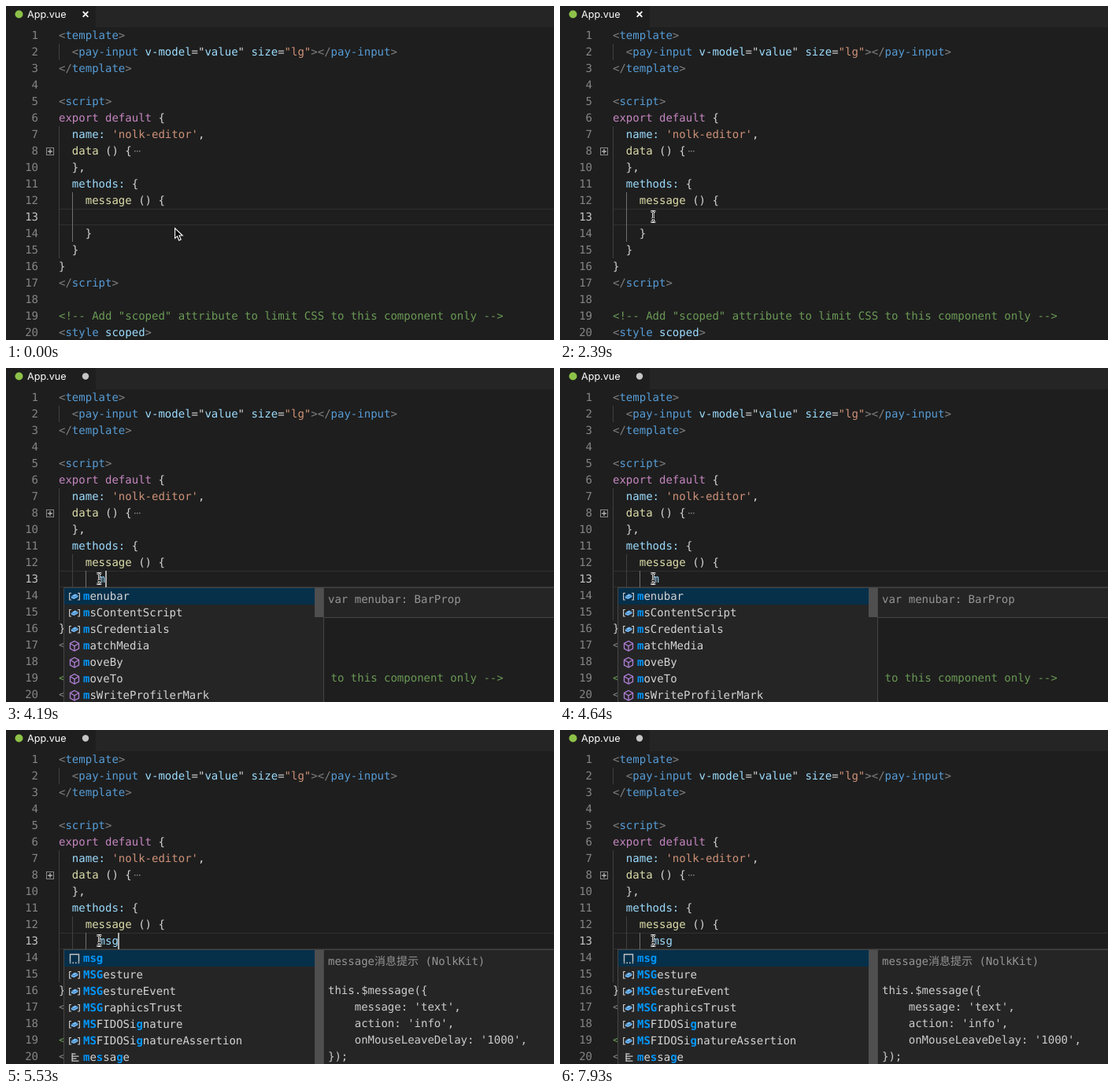
An HTML page with a canvas for the animation above (8 s loop, 696 by 425 pixels).

```html
<!DOCTYPE html>
<html lang="en">
<head>
<meta charset="utf-8">
<title>Editor autocomplete</title>
<style>
html, body { margin: 0; width: 100%; height: 100%; overflow: hidden; background: #1e1e1e; }
canvas { display: block; width: 696px; height: 425px; }
</style>
</head>
<body>
<canvas id="stage" width="696" height="425"></canvas>
<script>
const ctx = document.getElementById('stage').getContext('2d');
const LOOP = 8000, LINE = 21, TOP = 27, LEFT = 67, CHAR = 14 * 0.60205;
const MONO = '14px "DejaVu Sans Mono", "Noto Sans CJK SC", "Noto Sans CJK JP", monospace';
const C = {
  grey: '#808080', tag: '#569cd6', attr: '#9cdcfe', str: '#ce9178', text: '#d4d4d4',
  key: '#c586c0', fn: '#dcdcaa', note: '#6a9955', hit: '#0097fb'
};

// Each line: number, indent in columns, then colour/text pairs.
const CODE = [
  [1, 0, 'grey', '<', 'tag', 'template', 'grey', '>'],
  [2, 2, 'grey', '<', 'tag', 'pay-input', 'attr', ' v-model', 'text', '="', 'attr', 'value', 'text', '"',
    'attr', ' size', 'text', '=', 'str', '"lg"', 'grey', '></', 'tag', 'pay-input', 'grey', '>'],
  [3, 0, 'grey', '</', 'tag', 'template', 'grey', '>'],
  [4, 0],
  [5, 0, 'grey', '<', 'tag', 'script', 'grey', '>'],
  [6, 0, 'key', 'export default', 'text', ' {'],
  [7, 2, 'attr', 'name:', 'str', " 'nolk-editor'", 'text', ','],
  [8, 2, 'fn', 'data', 'text', ' () {'],
  [10, 2, 'text', '},'],
  [11, 2, 'attr', 'methods:', 'text', ' {'],
  [12, 4, 'fn', 'message', 'text', ' () {'],
  [13, 6],
  [14, 4, 'text', '}'],
  [15, 2, 'text', '}'],
  [16, 0, 'text', '}'],
  [17, 0, 'grey', '</', 'tag', 'script', 'grey', '>'],
  [18, 0],
  [19, 0, 'note', '<!-- Add "scoped" attribute to limit CSS to this component only -->'],
  [20, 0, 'grey', '<', 'tag', 'style', 'attr', ' scoped', 'grey', '>']
];

// Suggestions: icon name, then label with matched letters in brackets.
const STEPS = [
  { at: 4190, typed: 'm', thumb: 37, box: 39,
    items: ['field [m]enubar', 'field [m]sContentScript', 'field [m]sCredentials', 'cube [m]atchMedia',
      'cube [m]oveBy', 'cube [m]oveTo', 'cube [m]sWriteProfilerMark'],
    head: ['var menubar: BarProp'], body: [] },
  { at: 4940, typed: 'ms', thumb: 57, box: 60,
    items: ['field [ms]ContentScript', 'field [ms]Credentials', 'cube [ms]WriteProfilerMark', 'snip [ms]g',
      'field [MS]Assertion', 'field [MS]BlobBuilder', 'field [MS]Credentials'],
    head: ['var msContentScript: ExtensionScri', 'tApis'], body: [] },
  { at: 5530, typed: 'msg', thumb: 150, box: 160,
    items: ['snip [msg]', 'field [MSG]esture', 'field [MSG]estureEvent', 'field [MSG]raphicsTrust',
      'field [MS]FIDOSi[g]nature', 'field [MS]FIDOSi[g]natureAssertion', 'word [m]e[s]sa[g]e'],
    head: ['message消息提示 (NolkKit)'],
    body: ['this.$message({', "    message: 'text',", "    action: 'info',", "    onMouseLeaveDelay: '1000',", '});'] }
];

// Pointer stops: time, x, y.
const PATH = [[0, 214, 282], [150, 174, 268], [300, 167, 267], [750, 162, 267], [900, 119, 263],
  [1050, 109, 261], [1200, 105, 260], [1500, 109, 261], [1650, 116, 263]];
const BEAM_AT = 1800;
// The caret flips at each of these; typing turns it on again.
const FLIPS = [1940, 2390, 2840, 3440, 3890, 4640, 5380, 5980, 6430, 6880, 7480, 7930];

function rect(x, y, w, h, color) {
  ctx.fillStyle = color;
  ctx.fillRect(x, y, w, h);
}

function line(color, width, ...points) {
  ctx.strokeStyle = color;
  ctx.lineWidth = width;
  ctx.beginPath();
  points.forEach(([x, y], i) => i ? ctx.lineTo(x, y) : ctx.moveTo(x, y));
  ctx.stroke();
}

function dot(x, y, r, color) {
  ctx.fillStyle = color;
  ctx.beginPath();
  ctx.arc(x, y, r, 0, 7);
  ctx.fill();
}

function text(str, x, y, color, font = MONO) {
  ctx.font = font;
  ctx.fillStyle = color;
  ctx.fillText(str, x, y);
}

const rowTop = row => TOP + row * LINE;
const baseline = row => rowTop(row) + 15;

function drawTabs(dirty) {
  rect(0, 0, 696, 27, '#252526');
  rect(0, 0, 114, 27, '#1e1e1e');
  dot(16.5, 10.5, 5, '#8dc149');
  text('App.vue', 27, 15, '#ffffff', '12.6px Inter, sans-serif');
  if (dirty) {
    dot(101, 10.5, 4.2, '#c5c5c5');
  } else {
    line('#ffffff', 1.8, [97.7, 7.2], [104.3, 13.8]);
    line('#ffffff', 1.8, [104.3, 7.2], [97.7, 13.8]);
  }
}

function drawGuides(typed) {
  const dim = '#404040', lit = '#707070';
  rect(67, rowTop(1), 1, LINE, dim);
  rect(67, rowTop(6), 1, LINE * 8, dim);
  rect(84, rowTop(10), 1, LINE * 3, typed ? dim : lit);
  if (typed) rect(101, rowTop(11), 1, LINE, lit);
}

function drawCode(typed) {
  rect(LEFT, 258, 696 - LEFT, 1, '#303030');
  rect(LEFT, 278, 696 - LEFT, 1, '#303030');
  drawGuides(typed);
  CODE.forEach(([num, indent, ...parts], row) => {
    const y = baseline(row), label = String(num);
    text(label, 41 - label.length * CHAR, y, num === 13 ? '#c6c6c6' : '#858585');
    let x = LEFT + indent * CHAR;
    for (let i = 0; i < parts.length; i += 2) {
      text(parts[i + 1], x, y, C[parts[i]]);
      x += parts[i + 1].length * CHAR;
    }
  });
  text(typed, LEFT + 6 * CHAR, baseline(11), C.attr);

  // Folded block
  ctx.strokeStyle = '#8a8a8a';
  ctx.lineWidth = 1;
  ctx.strokeRect(51.5, 180.5, 9, 9);
  rect(53, 184.5, 6, 1.2, '#c5c5c5');
  rect(55.4, 182, 1.2, 6, '#c5c5c5');
  for (let i = 0; i < 3; i++) rect(163 + i * 3, 184, 1.6, 1.4, '#858585');
}

const ICONS = {
  field(x, y) {
    for (const s of [-1, 1]) {
      line('#c5c5c5', 1.2, [x + s * 4, y - 4], [x + s * 6.4, y - 4], [x + s * 6.4, y + 4.5], [x + s * 4, y + 4.5]);
    }
    ctx.fillStyle = '#75beff';
    ctx.beginPath();
    [[-4.2, 0], [0.5, -3], [4.4, -1.6], [4.4, 0.8], [-0.4, 3.5], [-4.2, 2.2]].forEach(p => ctx.lineTo(x + p[0], y + p[1]));
    ctx.fill();
    line('#25506f', 0.7, [x - 4, y], [x - 0.4, y + 1.1], [x + 4.2, y - 1.5]);
  },
  cube(x, y) {
    const c = '#b180d7';
    line(c, 1.3, [x, y - 6], [x + 5.5, y - 3], [x + 5.5, y + 3.5], [x, y + 6.6], [x - 5.5, y + 3.5],
      [x - 5.5, y - 3], [x, y - 6], [x + 5.5, y - 3]);
    line(c, 1.3, [x - 5.5, y - 3], [x, y + 0.2], [x + 5.5, y - 3]);
    line(c, 1.3, [x, y + 0.2], [x, y + 6.6]);
  },
  snip(x, y) {
    line('#c5c5c5', 1.4, [x - 5.5, y + 4.5], [x - 5.5, y - 5], [x + 5.5, y - 5], [x + 5.5, y + 4.5]);
    for (let i = 0; i < 4; i++) rect(x - 6.2 + i * 3.6, y + 5, 1.6, 1.6, '#c5c5c5');
  },
  word(x, y) {
    [5, 9, 6, 9].forEach((w, i) => rect(x - 3.5, y - 5 + i * 3, w, 1.3, '#c5c5c5'));
    rect(x - 3.5, y - 5, 1.3, 10, '#c5c5c5');
  }
};

function drawLabel(label, y) {
  let x = 98;
  label.split(/[\[\]]/).forEach((part, i) => {
    const hit = i % 2 === 1;
    text(part, x, y, hit ? C.hit : C.text, (hit ? 'bold ' : '') + MONO);
    x += part.length * CHAR;
  });
}

function drawPopup(step) {
  rect(73, 279, 331, 160, '#454545');
  rect(74, 280, 329, 160, '#252526');
  rect(74, 280, 318, 21, '#062f4a');
  rect(392, 280, 11, step.thumb, '#4f4f50');
  step.items.forEach((item, i) => {
    const [icon, label] = item.split(' ');
    ICONS[icon](87, 290.5 + i * LINE);
    drawLabel(label, 295 + i * LINE);
  });

  rect(403, 279, 293, step.box, '#454545');
  rect(404, 280, 292, step.box - 2, '#252526');
  step.head.forEach((s, i) => text(s, 409, 299 + i * LINE, '#959595'));
  step.body.forEach((s, i) => text(s, 409, 336 + i * LINE, '#cccccc'));
}

function drawArrow(x, y) {
  const pts = [[0.6, 0.8], [0.6, 13.6], [3.6, 10.9], [5.7, 16.2], [8.2, 15.2], [6, 10], [10.2, 10]];
  ctx.beginPath();
  pts.forEach(p => ctx.lineTo(x + p[0], y + p[1]));
  ctx.closePath();
  ctx.fillStyle = '#000000';
  ctx.fill();
  ctx.strokeStyle = '#ffffff';
  ctx.lineWidth = 1.1;
  ctx.stroke();
}

function drawBeam(x, y) {
  for (const [color, w] of [['#ffffff', 2.6], ['#000000', 0.9]]) {
    line(color, w, [x - 3, y + 1.3], [x - 1.2, y + 1.3], [x, y + 2.5], [x + 1.2, y + 1.3], [x + 3, y + 1.3]);
    line(color, w, [x, y + 2], [x, y + 14]);
    line(color, w, [x - 3, y + 14.7], [x - 1.2, y + 14.7], [x, y + 13.5], [x + 1.2, y + 14.7], [x + 3, y + 14.7]);
    line(color, w, [x - 1.7, y + 10.5], [x + 1.7, y + 10.5]);
  }
}

function caretOn(t, step) {
  const start = step ? step.at : 0;
  const flips = FLIPS.filter(f => f > start && f <= t).length;
  return (flips + (step ? 1 : 0)) % 2 === 1;
}

function draw(t) {
  const step = STEPS.filter(s => s.at <= t).pop();
  const typed = step ? step.typed : '';
  rect(0, 0, 696, 425, '#1e1e1e');
  drawTabs(!!step);
  drawCode(typed);
  if (caretOn(t, step)) rect(Math.floor(LEFT + (6 + typed.length) * CHAR), 258, 2, 21, '#aeafad');
  if (step) drawPopup(step);
  if (t >= BEAM_AT) {
    drawBeam(118.3, 260);
  } else {
    const [, x, y] = PATH.filter(p => p[0] <= t).pop();
    drawArrow(x, y);
  }
}

ctx.textRendering = 'geometricPrecision';
const begin = performance.now();
function tick() {
  draw((performance.now() - begin) % LOOP);
  requestAnimationFrame(tick);
}
tick();
</script>
</body>
</html>
```
